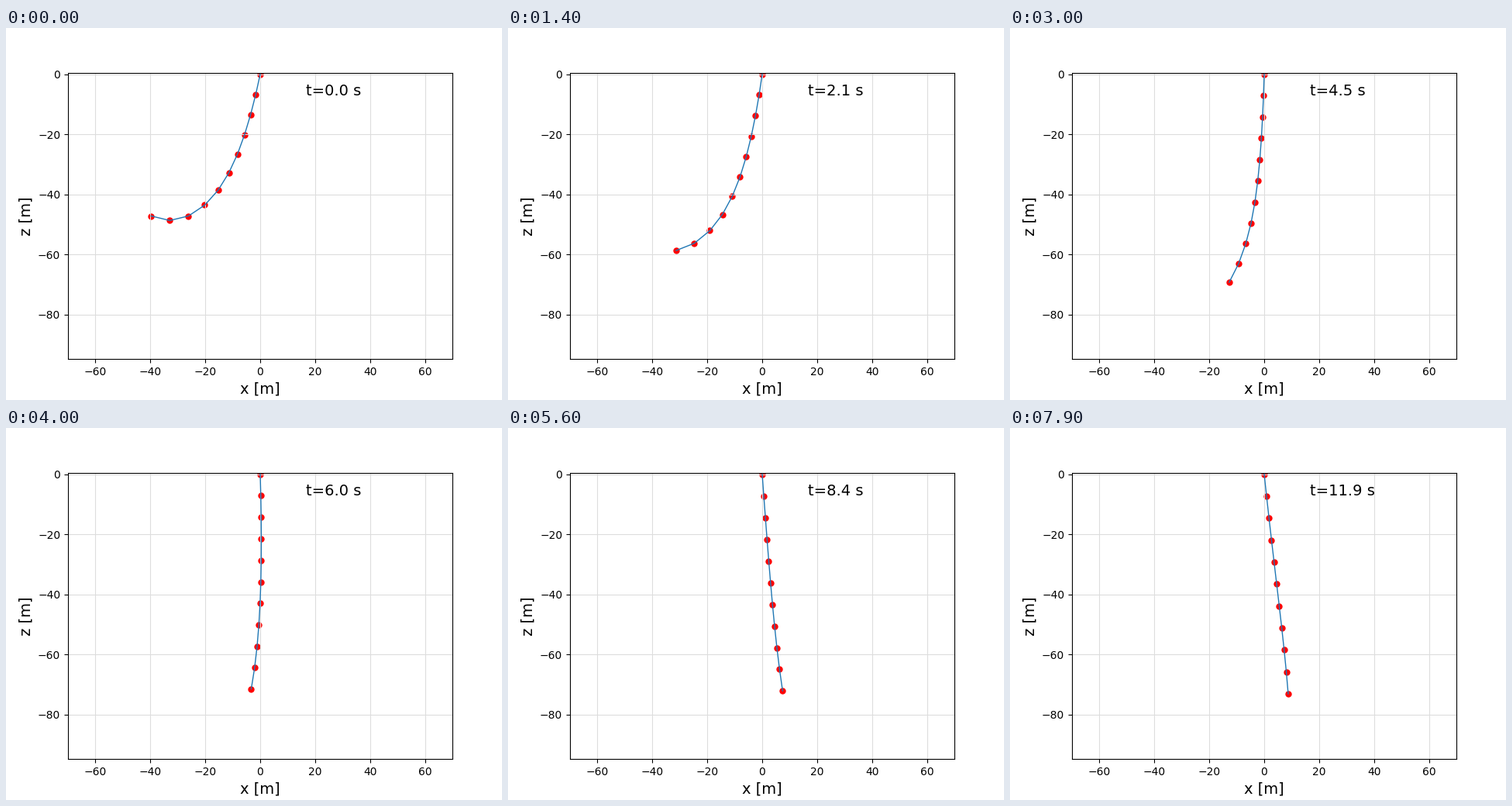
Recreate the animation shown at these times as a matplotlib script. Size 640 by 480 pixels, loop 8 s.

```python
import numpy as np
import matplotlib.pyplot as plt
from matplotlib.animation import FuncAnimation

FRAMES, INTERVAL = 80, 100
DT = 0.1503  # simulated seconds per frame
LINKS = 10
MID = (np.arange(LINKS) + 0.5) / LINKS  # link centres along the chain

# Key poses: frame, then lean, bend and tip curl in degrees
POSES = np.array([
    [0, -12.5, -20.2, -84.7],
    [7, -10.8, -20.7, -71.0],
    [21, -6.0, -7.4, -45.2],
    [40, 2.0, -6.0, -7.3],
    [49, 3.1, 0.5, -1.6],
    [63, 6.0, -0.9, 8.2],
    [79, 6.6, 2.2, -4.0],
])
KEYS, SHAPE = POSES[:, 0], np.radians(POSES[:, 1:])


def spline_slopes(t, y):
    """Slopes of a cubic spline that starts at rest and ends naturally."""
    n, h = len(t), np.diff(t)
    chord = np.diff(y, axis=0) / h[:, None]
    a, b = np.zeros((n, n)), np.zeros_like(y)
    a[0, 0] = 1
    for i in range(1, n - 1):
        p, q = 1 / h[i - 1], 1 / h[i]
        a[i, i - 1:i + 2] = p, 2 * (p + q), q
        b[i] = 3 * (p * chord[i - 1] + q * chord[i])
    a[-1, -2:] = 1, 2
    b[-1] = 3 * chord[-1]
    return np.linalg.solve(a, b)


SLOPES = spline_slopes(KEYS, SHAPE)


def shape_at(frame):
    i = min(np.searchsorted(KEYS, frame, side="right") - 1, len(KEYS) - 2)
    h = KEYS[i + 1] - KEYS[i]
    u = (frame - KEYS[i]) / h
    w = u * u * (3 - 2 * u)
    return (SHAPE[i] * (1 - w) + SHAPE[i + 1] * w
            + h * u * (1 - u) * (SLOPES[i] * (1 - u) - SLOPES[i + 1] * u))


def chain_at(frame):
    """Node positions: equal links, slowly stretching, turned along the chain."""
    lean, bend, curl = shape_at(frame)
    angle = lean + bend * MID + curl * MID ** 3.5
    link = 6.97 + 0.005 * frame
    x = np.cumsum(link * np.sin(angle))
    z = -np.cumsum(link * np.cos(angle))
    return np.append(0, x), np.append(0, z)


fig, ax = plt.subplots(figsize=(6.4, 4.8), dpi=100)
ax.set_xlim(-70, 70)
ax.set_ylim(-94.8, 0.5)
ax.set_xlabel("x [m]", fontsize=14)
ax.set_ylabel("z [m]", fontsize=14)
ax.grid(color="#dddddd", linewidth=0.8)

x0, z0 = chain_at(0)
dots = ax.scatter(x0, z0, s=25, color="red", zorder=1)
line, = ax.plot(x0, z0, color="C0", linewidth=1)
clock = fig.text(386.6 / 640, 393 / 480, "", fontsize=14)


def update(frame):
    x, z = chain_at(frame)
    dots.set_offsets(np.column_stack([x, z]))
    line.set_data(x, z)
    clock.set_text(f"t={frame * DT:.1f} s")
    return dots, line, clock


anim = FuncAnimation(fig, update, frames=FRAMES, interval=INTERVAL,
                     repeat=True, repeat_delay=0, blit=False)
plt.show()
```
